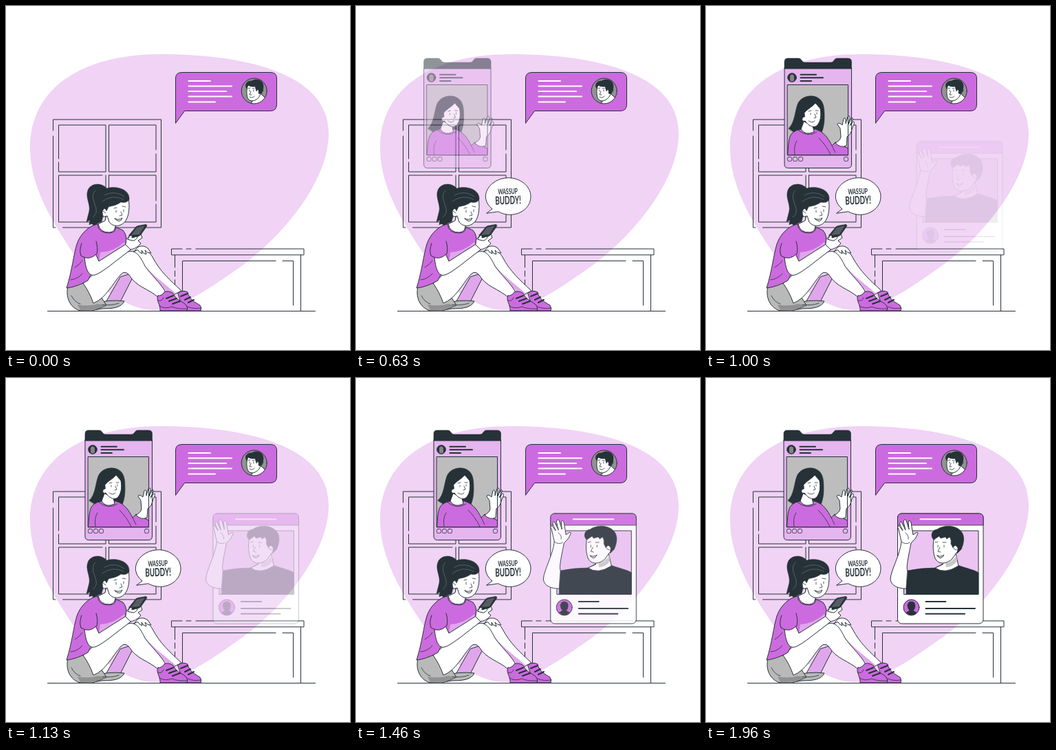
These frames come from a looping animation (500x500 px, 2 s). An HTML page:

```html
<!DOCTYPE html>
<html lang="en">
<head>
<meta charset="utf-8">
<title>Video chat</title>
<style>
html, body { margin: 0; width: 100%; height: 100%; overflow: hidden; background: #fff; }
svg { display: block; width: 100%; height: 100%; }
g, path, rect, circle { stroke-linecap: round; stroke-linejoin: round; }
.ln { fill: none; stroke: #263238; stroke-width: 1; }
.w { fill: #fff; stroke: #263238; stroke-width: 1; }
.p { fill: #cc6bdf; stroke: #263238; stroke-width: 1; }
.d { fill: #263238; stroke: #263238; stroke-width: .6; }
.g { fill: #b9b9b9; stroke: #263238; stroke-width: 1; }
.shade { fill: #e0a6ec; }
.bar { fill: none; stroke: #263238; stroke-width: 2; }
.light { stroke: #fff; }
.fine { fill: none; stroke: #263238; stroke-width: .8; }
text { font: 700 11.5px Lato, "Open Sans", sans-serif; fill: #263238; text-anchor: middle; }
.big { font-size: 16.5px; }
</style>
</head>
<body>
<svg viewBox="0 0 500 500">
<defs><clipPath id="round"><circle cx="360.7" cy="123.5" r="18.3"/></clipPath></defs>

<path fill="#f0d3f5" d="M35 207C35 118 112 70 225 70C340 70 469 95 469 185C469 255 402 334 345 376C305 404 270 430 232 440C190 452 130 412 98 360C78 328 35 270 35 207Z"/>

<!-- window -->
<path class="ln" d="M68.5 181V165H225.5V322H82.5M72 322H68.5V189
  M76.5 222V173H145V241H76.5V227M218 209V173H149.5V241H218V215
  M140 246H76.5V314H145V246M149.5 246H218V283M218 288V314H149.5V246"/>

<!-- table -->
<path class="ln" d="M256 353H240.5V361.8H433V353H276M262 353H269M428.5 362V443M245.5 362V380M245.5 385V393M245.5 398V412
  M256.5 415V370.5H392M402 370.5H417.5V435M60.5 443.5H449.5"/>

<!-- message -->
<path class="p" d="M246.5 170V105Q246.5 96.5 256 96.5H384Q393.5 96.5 393.5 105V143Q393.5 152.5 384 152.5H260Z"/>
<path class="bar light" d="M265.5 109H297M265.5 116.5H328M265.5 124H320M265.5 131.5H328M265.5 139.5H304"/>
<circle cx="360.7" cy="123.5" r="18.5" fill="#929292"/>
<g clip-path="url(#round)">
  <path class="w" d="M354 145L359 137 370 127 374 131 382 138V146Z"/>
  <path class="w" d="M351 116C349 124 350 132 352 135C356 141 366 137 369 130L374 123 367 112Z"/>
  <path class="d" d="M350 120C346 115 350 108 357 109C363 105 373 107 374 115Q375 122 370 128L367 127Q368 121 365 122L364 124 362 117Q355 118 352 115Z"/>
  <path class="fine" d="M354 122V124M360 122V124M352 120L355 119M358 120L361 120M356 124L354 129 357 129M354 132Q358 135 361 131"/>
</g>
<circle class="ln" cx="360.7" cy="123.5" r="18.5"/>

<!-- phone call -->
<g id="phone">
  <path fill="#e5b5ef" d="M113 90H210.5V230Q210.5 235.5 205 235.5H118.5Q113 235.5 113 230Z"/>
  <path class="d" d="M113 91V81Q113 76 118 76H133C139 76 137 82 143 82H180C186 82 184 76 190 76H205Q210.5 76 210.5 81V91Z"/>
  <circle class="d" cx="124" cy="104" r="6.5"/>
  <path fill="#858585" d="M121 108V103Q121 99.5 124 99.5T127 103V108Q124 111 121 108Z"/>
  <path class="bar" d="M136.5 99.7H159M136.5 104.3H169M136.5 109H152"/>
  <rect x="117.5" y="114.5" width="88" height="102" fill="#bdbdbd"/>
  <path class="d" d="M119 178C128 170 128 154 132 143C137 130 156 127 165 136C171 142 171 152 171 162C171 172 169 180 166 186L128 184Z"/>
  <path class="p" d="M117.5 216.5C119 204 118 190 125 184Q130 180 137 179H158C171 183 177 193 182 203L187 198 205.5 207V216.5Z"/>
  <path class="w" d="M141 168L137 179Q143 189 156 183L154 174Z"/>
  <path class="w" d="M142 155C147 149 153 147 158 141L165 149C167 160 165 168 161 173C155 179 147 173 143 167C138 169 137 162 142 161Z"/>
  <path class="d" d="M137 164C137 151 147 147 157 140Q164 143 167 153C168 143 162 134 152 134C141 135 134 148 135 163Z"/>
  <path class="fine" d="M151 156V158M160 155V157M157 157L159 162 156 163M148 153L152 152M158 152L162 152M148 167Q153 171 157 167M132 180Q147 192 160 183M131 196Q126 203 128 216M163 192Q174 203 180 216M182 203L187 213"/>
  <path class="w" d="M187 199Q194 196 195 190L194 178 190 172Q191 168 197 173L199 164Q201 161 202 165V171L205 161Q208 158 208 163L206 172 210 163Q213 161 212 166L208 174 213 168Q216 168 213 174C210 180 211 185 204 190L203 203Q194 207 187 199Z"/>
  <rect class="ln" x="117.5" y="114.5" width="88" height="102"/>
  <path class="ln" d="M113 90V230Q113 235.5 118.5 235.5H205Q210.5 235.5 210.5 230V90"/>
  <g class="fine" id="icons"></g>
</g>

<!-- girl: far leg, shorts, near leg -->
<path class="shade ln" style="fill:#e0a6ec" d="M188 387L166 430 143 434 166 394Z"/>
<path class="g" d="M127 433Q149 426 172 429C168 438 156 440 140 440L121 443Z"/>
<path class="w" d="M184 358C195 349 207 354 213 365C224 386 238 398 255 414L243 420C224 403 207 386 193 371Z"/>
<path class="shade" d="M194 368C209 388 226 400 246 417L241 420C220 404 204 386 193 371Z"/>
<path class="g" d="M90 408C86 423 93 439 108 443H125Q135 440 146 435L123 399Z"/>
<path class="w" d="M112 403C126 392 155 362 178 357C190 354 196 366 202 378C212 392 224 402 232 416L222 424C206 410 190 409 179 391Q173 384 167 390C154 405 145 425 127 432Q121 415 112 403Z"/>
<path fill="#929292" d="M104 434Q119 437 134 433L146 435 125 443 108 442Z"/>
<path class="fine" d="M95 421Q100 431 108 433M140 434Q153 436 164 432"/>

<!-- shoes -->
<path class="p" d="M250 417Q257 412 264 416C266 426 274 430 282 435Q285 439 283 443H258Z"/>
<path class="p" d="M221 421Q226 422 231 415Q240 414 244 419C247 428 257 429 262 435Q265 439 263 443H224C225 434 217 427 221 421Z"/>
<path class="bar" d="M233 425L243 421M237 429L248 425M242 433L253 429M254 422L264 418M260 427L268 423M265 431L273 427"/>
<path class="fine" d="M223 436Q231 441 241 437Q250 441 263 440M264 437Q273 441 283 439M221 428Q227 430 229 424"/>

<!-- shirt and arms -->
<path class="p" d="M133 317C121 319 108 331 103 346C98 362 96 385 88 410Q104 408 119 399L133 371 174 346Q177 334 170 326L154 319Z"/>
<path class="shade" d="M137 358Q157 357 172 343L174 347 135 371Z"/>
<path class="fine" d="M133 317Q134 331 151 330Q160 329 160 321M100 380Q107 376 111 370M94 398Q104 397 111 389"/>
<path class="w" d="M114 364C115 375 117 388 124 391C130 393 139 386 149 379L184 352 176 345 135 371 130 360Z"/>
<path fill="#cc6bdf" d="M108 340L109 363Q121 371 132 360L133 343 122 332Z"/>
<path class="ln" d="M110 345Q106 355 109 363Q121 371 132 360Q134 352 131 342"/>
<path class="w" d="M187 356L192 350Q200 347 206 352L211 359Q206 360 202 355L204 361Q199 360 197 355L198 360Q193 358 192 355Z"/>

<!-- head -->
<path class="d" d="M147 266C139 255 122 258 119 268C115 278 123 288 121 298L117 314 122 311 121 318Q126 315 127 319L139 313C143 302 138 293 136 286Z"/>
<path class="w" d="M146 304L144 312 134 317Q137 330 151 329 160 328 159 316Z"/>
<path class="w" d="M146 290L178 278C180 292 179 304 174 312C167 322 155 321 150 314L147 305C138 310 135 295 145 294Z"/>
<path class="d" d="M136 294C131 280 137 266 151 264C166 262 180 269 179 281Q176 287 167 285C159 291 154 290 149 292L146 298Q143 290 140 299L141 307Z"/>
<path d="M130 268Q123 274 129 288T126 307M143 275Q158 267 172 277M140 284Q155 273 171 281" fill="none" stroke="#718087" stroke-width=".6"/>
<path class="fine" d="M160 297V300M171 296V299M157 294L161 293M169 291L174 292M167 299L169 304 165 305M141 298L145 301"/>
<path class="w" d="M158 309Q164 312 169 308Q166 317 158 309Z"/>

<!-- held phone -->
<path class="w" d="M175 339L184 329 196 331 198 337 192 341 196 345C191 351 186 353 181 354L174 347Z"/>
<path class="d" d="M179 333L188 322Q189 320 192 319.500L203 317.500Q206 318 204 321L197 331Q195 334 192 335L182 337Q179 336 179 333Z"/>
<path fill="#555d62" d="M182 333L190 322 202 319 194 332Z"/>
<path class="w" d="M177 339L180 334Q184 332 183 337L190 335Q193 337 186 341Z"/>

<!-- greeting -->
<g id="greet">
  <path class="w" d="M190 301L198 295C176 277 195 250 221.5 249.7C239 249.7 254 262 254 277C254 297 229 311 207 299Z"/>
  <g transform="translate(221 281) rotate(-2) scale(.6 1)">
    <text y="-7.500">WASSUP</text>
    <text class="big" y="7">BUDDY!</text>
  </g>
</g>

<!-- post -->
<g id="post">
  <rect class="w" x="278.5" y="197" width="124.5" height="160" rx="6"/>
  <path class="p" d="M278.5 213.5V203Q278.5 197 284.5 197H397Q403 197 403 203V213.5Z"/>
  <path class="bar light" d="M311.5 205.3H370"/>
  <rect class="ln" x="288" y="222" width="108" height="92.5" style="fill:#ebc4f2"/>
  <path class="w" d="M293 280C290 276 295 257 298 240Q306 233 308 226Q308 222 301 228L298 210Q296 205 294 209L295 220 291 207Q288 204 287 209L290 221 284 209Q281 208 282 213L286 222 281 215Q277 215 280 220L284 238C282 257 269 279 268 292C269 304 283 307 296 306Z"/>
  <path class="fine" d="M284 238Q291 243 296 239M290 225Q295 229 294 234"/>
  <path class="d" d="M293 280Q312 276 333 276L348 268 366 272C379 277 391 279 396 283V314H291V304Z"/>
  <path class="w" d="M346 264L344 271 333 276Q347 286 367 273L363 255Z"/>
  <path fill="#c8c8c8" d="M348 269Q358 268 364 258L365 266Q358 275 349 275Z"/>
  <path class="w" d="M332 230C329 242 330 254 333 262C338 272 349 270 357 264L364 254Q371 250 370 242L360 227Z"/>
  <path class="d" d="M331 235C326 231 327 221 336 220C346 213 363 214 370 222C377 229 375 240 371 249L365 255 366 247Q362 240 359 247L356 241Q357 235 354 231L350 234 348 231 341 233 339 230Z"/>
  <path class="fine" d="M337 243V246M346 243V246M333 239L337 238M344 239L349 239M340 246L337 252 341 253M360 248L364 250M316 285Q310 297 318 303M366 285Q372 293 369 303"/>
  <path class="w" d="M336 258Q341 261 346 257Q341 266 336 258Z"/>
  <circle class="p" cx="298.5" cy="333.5" r="11.5"/>
  <path class="d" d="M293 331Q293 325 298.5 325T304 331Q304 336 301 338L306 341Q299 348 291 341L296 338Q293 335 293 331Z"/>
  <path class="bar" d="M319.5 325H348.5M319.5 335H391M319.5 342.7H376"/>
</g>
</svg>
<script>
const el = id => document.getElementById(id);
const clamp = v => Math.min(1, Math.max(0, v));

el('icons').innerHTML = [117.5, 125.5, 133.5, 199.5]
  .map(x => `<rect x="${x}" y="219.5" width="6" height="6" rx="1.8"/>`).join('');

const bezier = (a, b, s) => 3 * a * s * (1 - s) ** 2 + 3 * b * s * s * (1 - s) + s ** 3;

// cubic-bezier(.36, -.01, .5, 1.38): eases in and overshoots
function spring(x) {
  if (x <= 0 || x >= 1) return clamp(x);
  let lo = 0, hi = 1;
  for (let i = 0; i < 24; i++) {
    const mid = (lo + hi) / 2;
    if (bezier(.36, .5, mid) < x) lo = mid; else hi = mid;
  }
  return bezier(-.01, 1.38, lo);
}

function slide(id, t, start, from) {
  const k = spring((t - start) / 1100);
  el(id).setAttribute('transform', `translate(${from * (1 - k)} 0)`);
  el(id).style.opacity = clamp(k);
}

function draw(now) {
  const t = now % 2000;
  el('greet').style.opacity = clamp((t - 130) / 520);
  slide('phone', t, 200, -30);
  slide('post', t, 840, 30);
  requestAnimationFrame(draw);
}
draw(0);
</script>
</body>
</html>
```
